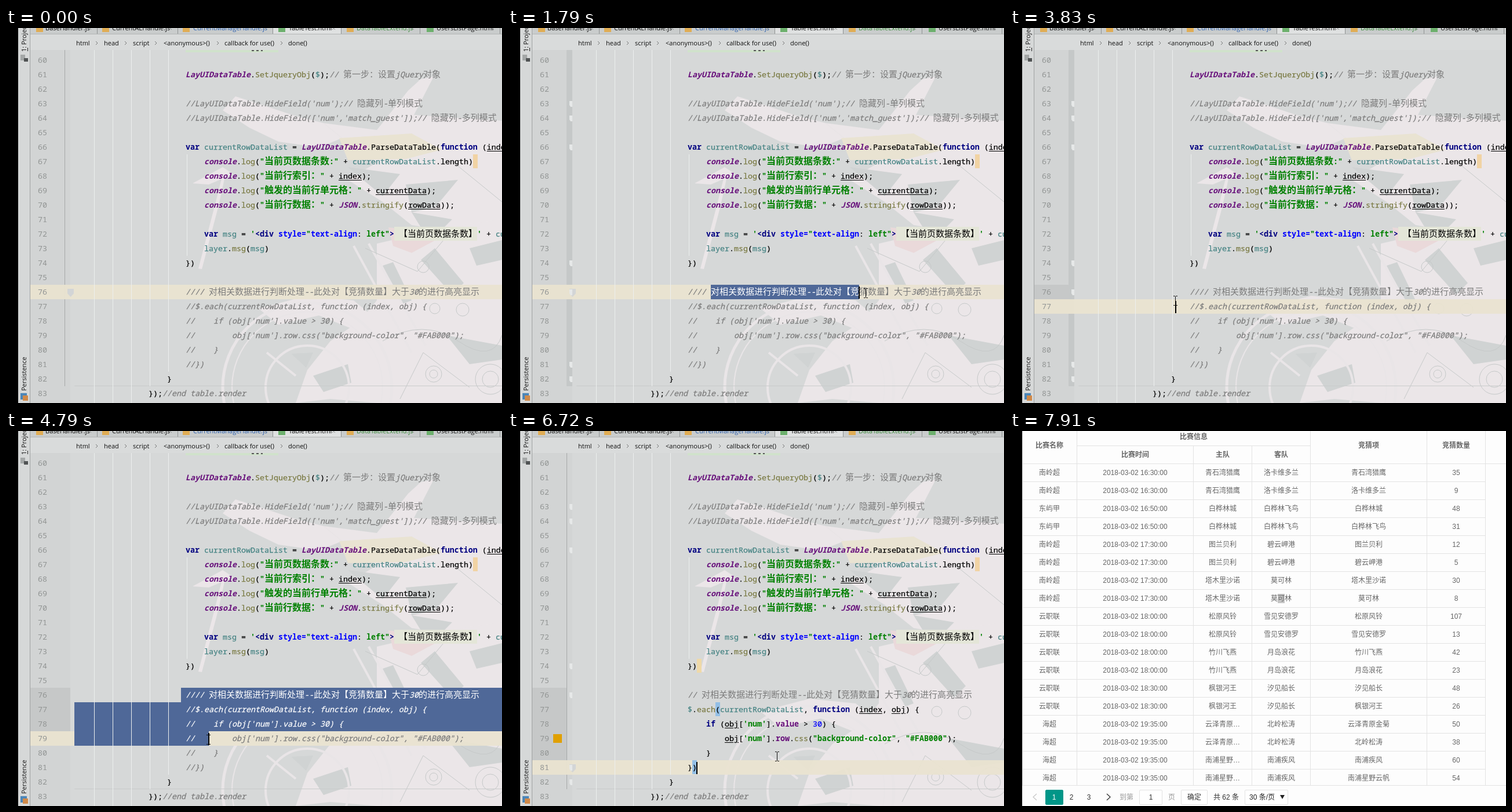
Write an HTML page that moves like this. It is 856x647 px and loops after 8000 ms.

```html
<!DOCTYPE html>
<html lang="zh">
<head>
<meta charset="utf-8">
<title>Code editor</title>
<style>
html, body { margin: 0; width: 100%; height: 100%; overflow: hidden; background: #000; }
#stage { position: relative; width: 856px; height: 647px; overflow: hidden; background: #d6d8d8; }
#stage div, #stage svg { position: absolute; box-sizing: border-box; }
.fill { inset: 0; }
.line, .num { height: 25px; white-space: pre; font: 13.333px/25px "Noto Sans Mono", "Noto Sans CJK SC", monospace; color: #000; }
.line { -webkit-text-stroke: .25px; }
.num { left: 55px; color: #929594; }
.line span { line-height: 0; }
.c { color: #7c7c7c; font-style: italic; }
.k, .s, .p, .q, .a { font-weight: bold; -webkit-text-stroke: 0; }
.k { color: #000080; }
.s { color: #008000; }
.p { color: #660e7a; font-style: italic; }
.q { color: #660e7a; }
.f { color: #7a7a43; }
.v { color: #458383; }
.n { color: #0000ff; }
.a { color: #0000ff; }
.u { text-decoration: underline; text-underline-offset: 2px; }
.i { background: #e4e6d8; padding: 3px 0; }
.w { background: #f1d3a4; padding: 3px 0; }
.cjk { font-size: 16px; font-style: normal; -webkit-text-stroke: 0; }
.c .cjk, .i .cjk { font-size: 15px; }
.done .t { background: #efd9a8; padding: 3px 0; }
.done .m { background: #93bfe6; padding: 3px 0; }
.guides { background: linear-gradient(#ecefee 0 0) 152px 38px / 1px 609px no-repeat,
  linear-gradient(#ecefee 0 0) 184px 38px / 1px 609px no-repeat,
  linear-gradient(#ecefee 0 0) 216px 38px / 1px 609px no-repeat,
  linear-gradient(#ecefee 0 0) 248px 38px / 1px 580px no-repeat,
  linear-gradient(#ecefee 0 0) 280px 38px / 1px 555px no-repeat,
  linear-gradient(#ecefee 0 0) 312px 218px / 1px 175px no-repeat; }
#sel { background-color: #4f6898; }
#sel span, #sel .line { color: #fff; background: none; }
#row { left: 42px; width: 814px; height: 25px; background: rgba(234, 228, 209, .94); }
#grey { left: 42px; top: 443px; background: #c6c8c8; }
#edge { left: 101px; top: 38px; height: 580px; }
#caret { width: 2px; height: 21px; background: #000; }
#swatch { left: 78px; top: 523px; width: 15px; height: 15px; background: #e0a000; }
.ui { font: 11px/16px "Open Sans", "Noto Sans", sans-serif; color: #111; white-space: pre; }
.side { transform-origin: 0 0; transform: rotate(-90deg); }
#table { left: 21px; top: 0; width: 835px; height: 647px; background: #fdfdfd; overflow: hidden; }
#table .t { font: 12px/16px "Liberation Sans", "Noto Sans CJK SC", sans-serif; color: #666; white-space: pre; transform: translateX(-50%); }
#table .r { background: #e3e3e3; }
#table .box { border: 1px solid #e2e2e2; border-radius: 2px; background: #fff; }
</style>
</head>
<body>
<div id="stage">
  <svg class="fill" width="856" height="647" fill="none">
    <g fill="#ebe6e8">
      <path d="M374 142L396 118 440 132 500 152 548 164 580 190 540 206 470 196 420 172Z"/>
      <path d="M548 164L640 176 694 108 716 88 738 84 704 150 856 160V330L770 352 700 340 650 300 590 262 640 232 580 190Z"/>
      <path d="M640 372L760 344 856 330V647H640L560 640 500 647 520 590 560 540 610 506 640 470Z"/>
      <path d="M436 484L520 462 600 470 636 500 600 520 540 496 470 512Z"/>
      <path d="M332 415L362 300 374 252 378 256 366 310 338 416ZM322 268L374 240 392 252 350 270Z"/>
    </g>
    <path d="M575 190L700 182 752 210 690 226 590 228Z" fill="#e9e3d2"/>
    <path d="M660 344L760 356 700 388 668 376Z" fill="#ead9da"/>
    <g fill="#d0d3d3">
      <path d="M590 240L680 252 650 290ZM690 270L780 262 740 310 700 318ZM700 318L770 330 752 348 716 344Z"/>
      <path d="M530 600L590 580 596 612 548 628ZM492 562L530 560 518 586ZM760 530L856 548V572L800 580Z"/>
      <path d="M716 400L740 380 790 440 770 460ZM650 410L668 404 700 470 684 476ZM800 380L856 366V400L812 410Z"/>
    </g>
    <g stroke="#e9e5e7">
      <circle cx="520" cy="620" r="146" stroke-width="5"/>
      <circle cx="520" cy="620" r="130" stroke-width="2"/>
      <circle cx="520" cy="620" r="72" stroke-width="4"/>
      <path d="M450 560L500 600M600 376L700 560M626 372L724 548" stroke-width="4"/>
    </g>
    <g stroke="#c6c9c9">
      <circle cx="836" cy="606" r="26"/><circle cx="836" cy="606" r="14"/>
      <circle cx="738" cy="597" r="14"/><circle cx="738" cy="597" r="7"/>
      <circle cx="720" cy="412" r="10"/><circle cx="740" cy="484" r="9"/><circle cx="788" cy="486" r="11"/>
      <path d="M620 380L710 420 760 360M650 540Q720 500 780 540T856 530M680 640L720 560 800 620M770 230L856 300"/>
    </g>
    <path d="M118 617.5H856" stroke="#c9cbcb"/>
  </svg>
  <div style="left:42px;top:38px;width:69px;height:609px;background:#d2d4d4"></div>
  <div id="grey"></div>
  <div id="edge"></div>
  <div id="row"><svg id="shield" style="left:64px;top:7px" width="11" height="14" fill="#d3d5d6"><path d="M0 0H11V8L5.5 14 0 8Z"/></svg></div>
  <svg id="folds" class="fill" width="856" height="647" fill="#e6e8e8"></svg>
  <div id="swatch"></div>
  <div class="fill guides"></div>
  <div id="nums"></div>
  <div style="left:310px;top:38px;width:160px;height:4px;background:#d0e2cb"></div>
  <div style="left:424px;top:38px;width:19px;height:2px;background:repeating-linear-gradient(90deg,#555 0 4px,transparent 4px 8px)"></div>
  <div id="code" class="fill"></div>
  <div id="sel" class="fill guides"></div>
  <div id="caret"></div>
  <svg id="mouse" width="9" height="17" fill="none" stroke="#111"><path d="M1 .5H3.5L4.5 1.5 5.5.5H8M4.5 1V16M1 16.5H3.5L4.5 15.5 5.5 16.5H8"/></svg>
  <div id="bars"></div>
  <div id="table"></div>
  <div style="left:0;top:0;width:21px;height:647px;background:#000"></div>
</div>
<script>
const $ = id => document.getElementById(id);
const rowTop = n => 43 + (n - 60) * 25;

// ‹class text› marks a coloured token
const mark = s => s.replace(/</g, '&lt;')
  .replace(/[\u3000-\u9fff\uff00-\uffef]+/g, '<span class="cjk">$&</span>')
  .replace(/‹(\w) ([^›]*)›/g, '<span class="$1">$2</span>');
const line = (n, x, s) => `<div class="line" style="left:${x}px;top:${rowTop(n)}px">${mark(s)}</div>`;
const log = s => `‹p console›.‹f log›(${s}`;

const fixed = [
  [61, 310, '‹p LayUIDataTable›.‹f SetJqueryObj›(‹v $›);‹c // 第一步：设置jQuery对象›'],
  [63, 310, "‹c //LayUIDataTable.HideField('num');// 隐藏列-单列模式›"],
  [64, 310, "‹c //LayUIDataTable.HideField(['num','match_guest']);// 隐藏列-多列模式›"],
  [66, 310, '‹k var› ‹v currentRowDataList› = ‹p LayUIDataTable›.ParseDataTable(‹k function› (‹u index›'],
  [67, 342, log('‹s "当前页数据条数:"› + ‹v currentRowDataList›.length)‹w  ›')],
  [68, 342, log('‹s "当前行索引："› + ‹u index›);')],
  [69, 342, log('‹s "触发的当前行单元格："› + ‹u currentData›);')],
  [70, 342, log('‹s "当前行数据："› + ‹p JSON›.‹f stringify›(‹u rowData›));')],
  [72, 342, `‹k var› ‹v msg› = ‹s '›‹k <div› ‹a style=›‹s "›‹a text-align›: ‹s left"›‹k >›‹i  【当前页数据条数】›‹s '› + ‹v currentRow›`],
  [73, 342, '‹v layer›.‹f msg›(‹v msg›)'],
  [74, 310, '})‹t  ›'],
  [82, 278, '}'],
  [83, 246, '});‹c //end table.render›']
];
const note = ' 对相关数据进行判断处理--此处对【竞猜数量】大于30的进行高亮显示';
const commented = [
  '////' + note,
  '//$.each(currentRowDataList, function (index, obj) {',
  "//    if (obj['num'].value > 30) {",
  `//        obj['num'].row.css("background-color", "#FAB000");`,
  '//    }',
  '//})'
];
const active = [
  `‹c //${note}›`,
  '‹v $›.‹f each›‹m (›‹v currentRowDataList›, ‹k function› (‹u index›, ‹u obj›) {',
  "    ‹k if› (‹u obj›[‹s 'num'›].‹q value› > ‹n 30›) {",
  `        ‹u obj›[‹s 'num'›].‹q row›.‹f css›(‹s "background-color"›, ‹s "#FAB000"›);`,
  '    }',
  '}‹m )›'
];
const page = block => fixed.map(l => line(...l)).join('') + block.map((s, i) => line(76 + i, 310, s)).join('');
const pages = [page(commented.map(s => `‹c ${s}›`)), page(active)];

for (let n = 60; n < 84; n++) $('nums').innerHTML += `<div class="num" style="left:55px;top:${rowTop(n)}px">${n}</div>`;
$('folds').innerHTML = [63, 64, 66, 74, 76, 81, 82].map(n => `<path d="M106 ${rowTop(n) + 8}h5v10h-3l-2-3z"/>`).join('');

// tabs, breadcrumb and side bar
const rect = (x, y, w, h, color) => `<div style="left:${x}px;top:${y}px;width:${w}px;height:${h}px;background:${color}"></div>`;
const ui = (x, y, s, color = '#111', cls = '') => `<div class="ui ${cls}" style="left:${x}px;top:${y}px;color:${color}">${s.replace(/</g, '&lt;')}</div>`;
const stroke = (d, color, w = 1) => `<svg class="fill" width="856" height="647" fill="none" stroke="${color}" stroke-width="${w}"><path d="${d}"/></svg>`;
const orange = '#e0ad55', green = '#6db06d';
const tabs = [
  [52, 68, 'BaseHandler.js', '#111', orange, 157], [166, 183, 'CurrentAEHandle.js', '#111', orange, 296],
  [305, 323, 'CurrentManageHandle.js', '#2a5fb0', orange, 460], [470, 488, 'TableTest.html', '#111', green, 578],
  [588, 605, 'DataTableExtend.js', '#3a8a3a', orange, 714], [726, 743, 'UsersListPage.html', '#111', green, 852]
];
let bars = rect(42, 0, 814, 11, '#c9cccc') + rect(461, 0, 117, 11, '#dfe1e1') + rect(42, 10, 814, 1, '#b3b6b6') +
  rect(42, 11, 814, 27, '#d9dbdb') + rect(21, 0, 20, 647, '#d6d8d8') + rect(41, 0, 1, 647, '#9fa2a2');
for (const [ix, x, s, color, icon, end] of tabs)
  bars += rect(ix, 0, 12, 7, icon) + ui(x, -8, s, color) + rect(end, 0, 1, 10, '#8f9292') +
    stroke(`M${end - 15} 3l5-5m-5 0l5 5`, '#8a8d8d');
[[121, 'html'], [169, 'head'], [219, 'script'], [272, '<anonymous>()'], [377, 'callback for use()'], [487, 'done()']]
  .forEach(([x, s]) => bars += ui(x, 18, s));
bars += stroke([157, 207, 259, 366, 476].map(x => `M${x - 2} 23l3 3-3 3`).join(''), '#777');
bars += ui(23, 41, '1: Project', '#111', 'side') + rect(37, 34, 1, 6, '#222') + ui(23, 626, 'Persistence', '#111', 'side');
bars += rect(25, 46, 8, 10, '#a4a7a7') + rect(31, 52, 7, 6, '#505354') +
  rect(25, 630, 11, 11, '#4c86b8') + rect(29, 634, 9, 9, '#d08a4a');
$('bars').innerHTML = bars;

// result table, in stage coordinates shifted by the black margin
const R = (x, y, w, h) => `<div class="r" style="left:${x - 21}px;top:${y}px;width:${w}px;height:${h}px"></div>`;
const T = (x, y, s, css = '') => `<div class="t" style="left:${x - 21}px;top:${y - 8}px;${css}">${s}</div>`;
const B = (x, y, w, h, css = '') => `<div class="box" style="left:${x - 21}px;top:${y}px;width:${w}px;height:${h}px;${css}"></div>`;
const cols = [68, 216, 367, 468, 619, 770];
const games = [
  ['南岭超', '16:30', '青石湾猎鹰', '洛卡维多兰', 35, 9],
  ['东屿甲', '16:50', '白桦林城', '白桦林飞鸟', 48, 31],
  ['南岭超', '17:30', '图兰贝利', '碧云岬港', 12, 5],
  ['南岭超', '17:30', '塔木里沙诺', '莫可林', 30, 8],
  ['云职联', '18:00', '松原风铃', '雪见安德罗', 107, 13],
  ['云职联', '18:00', '竹川飞燕', '月岛浪花', 42, 23],
  ['云职联', '18:30', '枫银河王', '汐见船长', 48, 26, true],
  ['海超', '19:35', '云泽青原金菊', '北岭松涛', 50, 38],
  ['海超', '19:35', '南浦星野云帆', '南浦疾风', 60, 54, true]
];
const bold = 'font-weight:bold';
let table = T(68, 25, '比赛名称', bold) + T(317, 10, '比赛信息', bold) + T(216, 41, '比赛时间', bold) + T(367, 41, '主队', bold) +
  T(468, 41, '客队', bold) + T(619, 25, '竞猜项', bold) + T(770, 25, '竞猜数量', bold) +
  R(115, 25, 403, 1) + R(21, 56, 835, 1) + R(21, 611, 835, 1) + R(21, 0, 1, 611);
[115, 518, 719, 820].forEach(x => table += R(x, 0, 1, 611));
[316, 417].forEach(x => table += R(x, 25, 1, 586));
table += `<div style="left:441px;top:281px;width:12px;height:16px;background:#c4c4c4"></div>`;
games.forEach(([league, time, home, guest, a, b, swap], g) => [a, b].forEach((count, k) => {
  const y = 72 + (g * 2 + k) * 31;
  const shown = home.length > 5 ? home.slice(0, 4) + '…' : home;
  const cells = [league, `2018-03-02 ${time}:00`, shown, guest, !!swap === !!k ? home : guest, count];
  cells.forEach((s, i) => table += T(cols[i], y, s));
  if (y < 590) table += R(21, y + 15, 800, 1);
}));
table += B(61, 619, 31, 26, 'background:#009688;border-color:#009688') + T(76, 632, '1', 'color:#fff') +
  T(106, 632, '2', 'color:#333') + T(136, 632, '3', 'color:#333') + T(201, 632, '到第', 'color:#999') +
  B(223, 619, 40, 26) + T(243, 632, '1', 'color:#333') + T(279, 632, '页', 'color:#999') +
  B(295, 619, 46, 26) + T(318, 632, '确定', 'color:#333') + T(373, 632, '共 62 条', 'color:#333') +
  B(405, 619, 75, 26) + T(435, 632, '30 条/页', 'color:#222') +
  stroke('M25 626l-6 5.5 6 5.5', '#c8c8c8', 1.3) + stroke('M146 626l6 5.5-6 5.5', '#333', 1.3) +
  `<svg style="left:445px;top:628px" width="8" height="7"><path d="M0 0H8L4 7Z" fill="#222"/></svg>`;
$('table').innerHTML = table;

// glyph edges of the note on row 76
const stops = [350];
for (const ch of note.slice(1)) stops.push(stops.at(-1) + (ch < '\u0100' ? 8 : 15));

const step = (t, a, b, n) => Math.max(0, Math.min(n - 1, Math.floor((t - a) * (n - 1) / (b - a) + 1e-6)));
const path = (pts, i) => {
  let k = 0;
  while (k < pts.length - 2 && i > pts[k + 1][0]) k++;
  const [p, q] = [pts[k], pts[k + 1]], u = (i - p[0]) / (q[0] - p[0]);
  return [p[1] + (q[1] - p[1]) * u, p[2] + (q[2] - p[2]) * u];
};
const box = (l, t, r, b) => `polygon(${l}px ${t}px,${r}px ${t}px,${r}px ${b}px,${l}px ${b}px)`;
const drag = (row, x) => {
  const y = rowTop(row);
  return 'polygon(' + [[302, 443], [856, 443], [856, y], [x, y], [x, y + 25], [118, y + 25], [118, 468], [302, 468]]
    .map(p => p.map(v => v + 'px').join(' ')).join(',') + ')';
};

function state(t) {
  const s = { row: 76, caret: null, mouse: null, sel: null };
  if (t < 280) return s;
  if (t < 1380) {
    s.mouse = path([[0, 530, 579], [7, 352, 455]], step(t, 280, 1250, 8));
  } else if (t < 3680) {
    s.mouse = t < 2450 ? path([[0, 372, 457], [3, 617, 457], [7, 788, 457]], step(t, 1380, 2300, 8))
      : t < 3160 ? path([[0, 794, 457], [3, 811, 457]], step(t, 2450, 2880, 4))
      : path([[0, 812, 457], [1, 814, 457]], step(t, 3160, 3280, 2));
    s.caret = t < 3160 ? stops.filter(x => x <= s.mouse[0] - 8).pop() : 817;
    s.sel = box(350, 443, s.caret, 468);
  } else if (t < 6290) {
    const i = t < 4790 ? step(t, 3680, 4640, 8) : 8 + step(t, 4790, 5450, 6);
    s.mouse = path([[0, 301, 458], [1, 285, 470], [7, 332, 510], [8, 349, 532], [13, 362, 571]], i);
    s.row = Math.floor((s.mouse[1] - 43) / 25) + 60;
    const end = s.row === 76 ? 817 : 310 + commented[s.row - 76].length * 8;
    s.caret = Math.min(end, 310 + Math.round((s.mouse[0] - 310) / 8) * 8);
    if (i > 1) s.sel = drag(s.row, s.caret);
  } else {
    s.row = 81;
    s.caret = 326;
    if (t < 6570) { s.mouse = [362, 571]; s.sel = drag(81, 326); }
    else if (t < 7260) s.mouse = path([[0, 362, 571], [5, 870, 520]], step(t, 6570, 7260, 6));
  }
  return s;
}

let shown = -1;
const show = (id, on) => $(id).style.display = on ? '' : 'none';
function draw(t) {
  const s = state(t), which = +(t >= 6290), done = t >= 6708;
  if (which !== shown) {
    shown = which;
    $('code').innerHTML = $('sel').innerHTML = pages[which];
  }
  $('code').classList.toggle('done', done);
  show('sel', s.sel);
  if (s.sel) $('sel').style.clipPath = s.sel;
  show('mouse', s.mouse);
  if (s.mouse) $('mouse').style.transform = `translate(${Math.round(s.mouse[0]) - 4}px,${Math.round(s.mouse[1]) - 8}px)`;
  show('caret', s.caret);
  if (s.caret) $('caret').style.transform = `translate(${s.caret - 1}px,${rowTop(s.row) + 3}px)`;
  $('row').style.top = rowTop(s.row) + 'px';
  show('shield', s.row === 76 || s.row === 81);
  $('grey').style.height = (s.row - 76) * 25 + 'px';
  $('grey').style.width = (done ? 59 : 69) + 'px';
  const strip = t >= 1380 && t < 3954, rule = t < 1380 || done;
  $('edge').style.width = (strip ? 10 : rule ? 1 : 0) + 'px';
  $('edge').style.background = strip ? '#c5c8c8' : '#a6a9a9';
  show('folds', strip || done);
  show('swatch', done);
  show('table', t >= 7910);
}

const start = performance.now();
(function tick() {
  draw((performance.now() - start) % 8000);
  requestAnimationFrame(tick);
})();
</script>
</body>
</html>
```
